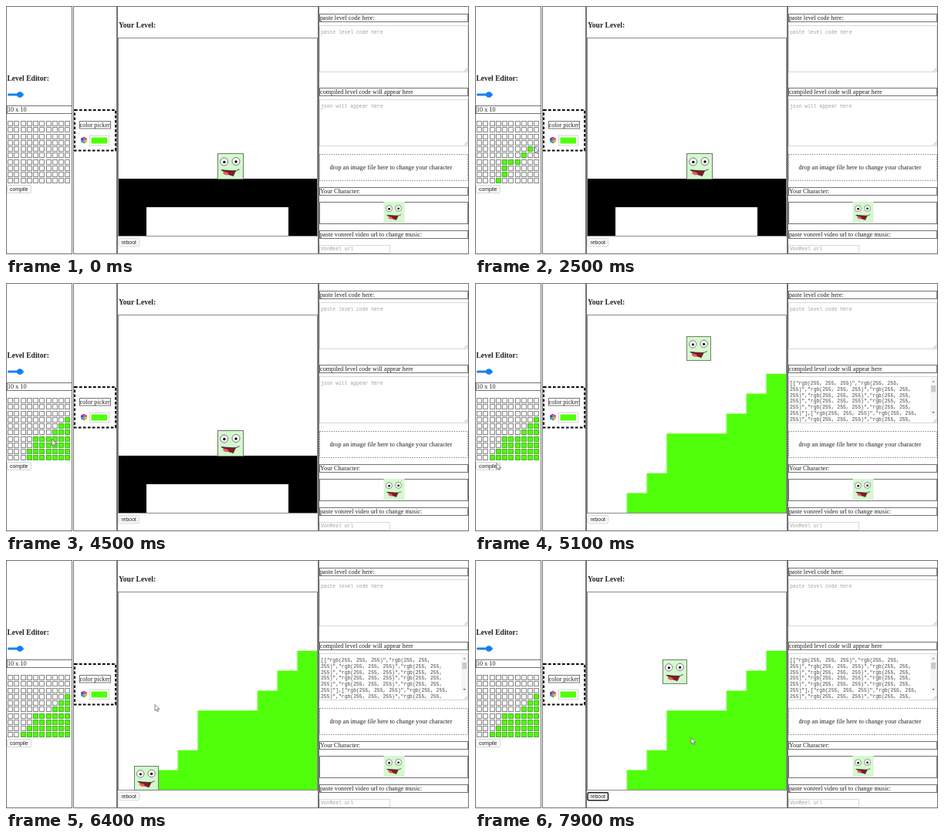
Animation of 600x323 px, one loop 8 s. Source, as an HTML page with a canvas:

```html
<!DOCTYPE html>
<html lang="en">
<head>
<meta charset="utf-8">
<title>Level editor</title>
<style>
html, body { margin: 0; width: 100%; height: 100%; overflow: hidden; background: #fff; }
canvas { display: block; }
</style>
</head>
<body>
<canvas id="stage" width="600" height="323"></canvas>
<script>
const ctx = document.getElementById('stage').getContext('2d');
const LOOP = 8000, STEP = 100;
const GREEN = '#50ff0a', LINE = '#727272';
const SERIF = '"Liberation Serif", serif';
const BODY = '8.2px ' + SERIF, HEAD = 'bold 9.6px ' + SERIF;
const SANS = '6.83px "Liberation Sans", sans-serif';
const MONO = '6.4px "Liberation Mono", monospace';
const TOPS = [10, 10, 9, 8, 6, 6, 6, 5, 4, 3];
const PITCH = 8.25, GRID_X = 2, GRID_Y = 149;
const LEVEL = { x: 145.4, y: 40.4, size: 258 };
const COMPILED = 5000, REBOOT = 7500, RESPAWN = 7650;

// Each stroke: start time, time per cell, cells as row and column digits
const strokes = [
  [500, 140, '93 84 74 64 65 66 57'],
  [1800, 100, '48'],
  [2800, 55, '39 49 59 69 79 89 99 98 97 75 83 94 95'],
  [3700, 75, '96 86 85 76 67 77 87 88 78 68 58'],
  [4650, 100, '92']
];
const painted = strokes.flatMap(([start, gap, cells]) =>
  cells.split(' ').map((c, i) => ({ t: start + i * gap, row: +c[0], col: +c[1] })));

const pointer = [
  [150, 90, 300],
  ...painted.map(c => [c.t, GRID_X + (c.col + .5) * PITCH, GRID_Y + (c.row + .5) * PITCH]),
  [1500, 68, 191], [2600, 78, 182], [3500, 46, 226],
  [4850, 28, 233.5], [5200, 28, 233.5], [5700, 193, 187.5], [7250, 193, 187.5],
  [7450, 160, 306], [7600, 160, 306], [7900, 280, 230.5]
].sort((a, b) => a[0] - b[0]);

function pointerAt(t) {
  if (t < pointer[0][0]) return null;
  const i = pointer.findIndex(p => p[0] > t);
  if (i < 0) return pointer[pointer.length - 1].slice(1);
  const [t0, x0, y0] = pointer[i - 1], [t1, x1, y1] = pointer[i];
  const k = (t - t0) / (t1 - t0);
  return [x0 + (x1 - x0) * k, y0 + (y1 - y0) * k];
}

// Ballistic height: start height, launch speed, seconds since launch
const fly = (y, v, s) => y - v * s + 1000 * s * s;

function heroAt(t) {
  if (t < COMPILED) return [274, 191, 34];
  const since = t0 => Math.max(0, t - t0) / 1000;
  let x = 274, y;
  if (t >= REBOOT) {
    x -= 180 * since(7728);
    y = Math.min(163, fly(66.5, 0, since(RESPAWN)));
  } else if (t < 5600) {
    y = Math.min(163, fly(66.5, 0, since(5050)));
  } else {
    x = Math.max(166, x - 180 * since(5600));
    y = t < 6400 ? fly(163, 431, since(5600)) : fly(267, 770, since(6400));
    y = Math.min(267, y);
  }
  return [Math.round(x), Math.round(y), 32];
}

function rect(x, y, w, h, fill) {
  ctx.fillStyle = fill;
  ctx.fillRect(x, y, w, h);
}

function box(x, y, w, h, color = LINE, width = 1, dash = []) {
  ctx.strokeStyle = color;
  ctx.lineWidth = width;
  ctx.setLineDash(dash);
  ctx.strokeRect(x + .5, y + .5, w, h);
  ctx.setLineDash([]);
}

function text(str, x, y, font = BODY, color = '#222') {
  ctx.font = font;
  ctx.fillStyle = color;
  ctx.fillText(str, x, y);
}

function shape(points, fill, stroke, width = 1) {
  ctx.beginPath();
  points.forEach(([x, y]) => ctx.lineTo(x, y));
  ctx.closePath();
  if (fill) { ctx.fillStyle = fill; ctx.fill(); }
  if (stroke) { ctx.strokeStyle = stroke; ctx.lineWidth = width; ctx.stroke(); }
}

function disc(x, y, r, fill, stroke) {
  ctx.beginPath();
  ctx.arc(x, y, r, 0, Math.PI * 2);
  ctx.fillStyle = fill;
  ctx.fill();
  if (stroke) { ctx.strokeStyle = stroke; ctx.lineWidth = .8; ctx.stroke(); }
}

function face(x, y, size, border) {
  ctx.save();
  ctx.translate(x, y);
  ctx.scale(size / 34, size / 34);
  rect(0, 0, 34, 34, '#d5f8cf');
  if (border) box(0, 0, 33, 33, '#6a7a67');
  disc(8.7, 11, 5, '#fff', '#555');
  disc(24, 10.5, 5, '#fff', '#555');
  disc(8.9, 11.5, 1.7, '#000');
  disc(24, 11, 1.7, '#000');
  shape([[5.5, 21.8], [23.5, 23], [20.5, 29.5], [13, 27.2]], '#8e1420', '#333', .7);
  ctx.beginPath();
  ctx.ellipse(10.8, 26.2, 3.6, 1.9, .25, 0, Math.PI * 2);
  ctx.fillStyle = '#ee5a66';
  ctx.fill();
  ctx.beginPath();
  ctx.moveTo(5, 21.8);
  ctx.quadraticCurveTo(22, 25.2, 28.5, 20.8);
  ctx.strokeStyle = '#333';
  ctx.lineWidth = .9;
  ctx.stroke();
  ctx.restore();
}

function button(label, x, y, w, focus) {
  ctx.beginPath();
  ctx.roundRect(x + .5, y + .5, w, 10, 1.5);
  ctx.fillStyle = '#fcfcfc';
  ctx.fill();
  ctx.strokeStyle = focus ? '#222' : '#d6d6d6';
  ctx.lineWidth = focus ? 1.5 : 1;
  ctx.stroke();
  text(label, x + 4, y + 8, SANS);
}

function label(str, y) {
  box(406, y, 192, 10);
  text(str, 407, y + 7.7);
}

function textarea(y, h) {
  box(406, y, 192, h, '#d8d8d8');
  ctx.strokeStyle = '#999';
  ctx.lineWidth = .6;
  ctx.beginPath();
  for (const d of [2, 4]) {
    ctx.moveTo(597.5 - d, y + h - .5);
    ctx.lineTo(598, y + h - d - .5);
  }
  ctx.stroke();
}

function editor(t) {
  text('Level Editor:', 1.4, 97.3, HEAD);
  ctx.beginPath();
  ctx.roundRect(2, 113.5, 21, 3, 1.5);
  ctx.fillStyle = '#1683f2';
  ctx.fill();
  disc(18, 115, 3.8, '#1080f0');
  box(1, 129, 84, 10);
  text('10 x 10', 2, 137.3);
  const cell = (row, col) => [Math.round(GRID_X + col * PITCH), Math.round(GRID_Y + row * PITCH)];
  for (let i = 0; i < 100; i++) {
    const [x, y] = cell(Math.floor(i / 10), i % 10);
    box(x, y, 7 - 1, 7 - 1, '#858585');
  }
  for (const c of painted) {
    if (c.t > t) continue;
    const [x, y] = cell(c.row, c.col);
    rect(x, y, 7, 7, GREEN);
    box(x, y, 6, 6, '#4f9a35', .8);
  }
  button('compile', 1, 232, 31);
}

function picker() {
  box(88.5, 134.5, 53, 52.5, '#000', 2, [3.6, 2.4]);
  box(95, 149, 40, 9.5);
  text('color picker', 95.5, 156.9);
  ['#e33b2e', '#f2a51d', '#35b44a', '#2678d9', '#2a2fa8', '#b433b8'].forEach((c, i) => {
    ctx.beginPath();
    ctx.moveTo(101, 174);
    ctx.arc(101, 174, 4.2, i * Math.PI / 3 - 1, (i + 1) * Math.PI / 3 - 1.15);
    ctx.fillStyle = c;
    ctx.fill();
  });
  box(108, 167.5, 25, 13, '#d4d4d4');
  rect(110.5, 170.5, 20.5, 8, GREEN);
}

function level(t) {
  const { x, y, size } = LEVEL;
  text('Your Level:', 145.9, 28, HEAD);
  if (t < COMPILED) {
    rect(146, 224, 258, 75, '#000');
    rect(182, 261, 184, 38, '#fff');
  } else {
    const cell = size / 10, bottom = y + size;
    const stairs = TOPS.flatMap((top, col) =>
      [[x + col * cell, y + top * cell], [x + (col + 1) * cell, y + top * cell]]);
    shape([...stairs, [x + size, bottom], [x, bottom]], GREEN);
    for (let col = 1; col < 10; col++) {
      const rise = (TOPS[col - 1] - TOPS[col]) * cell;
      rect(x + col * cell - 1, y + TOPS[col] * cell, 1.5, rise, '#b3f19c');
    }
  }
  box(145, 41, 258, 257, '#8a8a8a');
  face(...heroAt(t), true);
  button('reboot', 145.5, 301.3, 26.5, t >= REBOOT);
}

function compiledCode() {
  const white = '255)","rgb(255, 255, 255)","rgb(255, 255,';
  const lines = ['[["rgb(255, 255, 255)","rgb(255, 255,', white, white, white, white,
    '255)"],["rgb(255, 255, 255)","rgb(255, 255,', white];
  ctx.save();
  ctx.beginPath();
  ctx.rect(407, 122, 191, 58.5);
  ctx.clip();
  lines.forEach((s, i) => text(s, 408, 131.8 + i * 7.85, MONO, '#444'));
  rect(590, 122, 8, 51, '#f6f6f6');
  rect(591, 133, 6, 8.5, '#cbcbcb');
  shape([[592.3, 128.5], [595.7, 128.5], [594, 126.5]], '#888');
  shape([[592.3, 167], [595.7, 167], [594, 169]], '#666');
  ctx.restore();
}

function sidebar(t) {
  const hint = '#a0a0a0';
  label('paste level code here:', 10);
  textarea(25, 60);
  text('paste level code here', 408, 36.3, MONO, hint);
  label('compiled level code will appear here', 106);
  textarea(121, 60);
  if (t < COMPILED) text('json will appear here', 408, 132, MONO, hint);
  else compiledCode();
  box(406, 192, 192, 34, '#888', 1, [1.5, 1.5]);
  text('drop an image file here to change your character', 419.5, 211.9);
  label('Your Character:', 235);
  box(406, 254, 192, 28);
  face(489.5, 254, 27, false);
  label('paste vonreel video url to change music:', 291);
  box(406, 310, 91, 10, '#d8d8d8');
  text('VonReel url', 408, 316.8, MONO, hint);
}

function arrow(pos) {
  if (!pos) return;
  const outline = [[0, 0], [0, 8.2], [1.9, 6.5], [3.2, 9.3], [4.5, 8.7], [3.3, 6], [5.9, 6]];
  shape(outline.map(([x, y]) => [pos[0] + x, pos[1] + y]), '#fff', '#666', .8);
}

function draw(t) {
  rect(0, 0, 600, 323, '#fff');
  box(0, 0, 85, 321);
  box(87, 0, 56, 321);
  box(144, 0, 260, 321);
  box(405, 0, 194, 321);
  editor(t);
  picker();
  level(t);
  sidebar(t);
  arrow(pointerAt(t));
}

const begin = performance.now();
function tick() {
  const t = (performance.now() - begin) % LOOP;
  draw(Math.floor(t / STEP) * STEP);
  requestAnimationFrame(tick);
}
tick();
</script>
</body>
</html>
```
